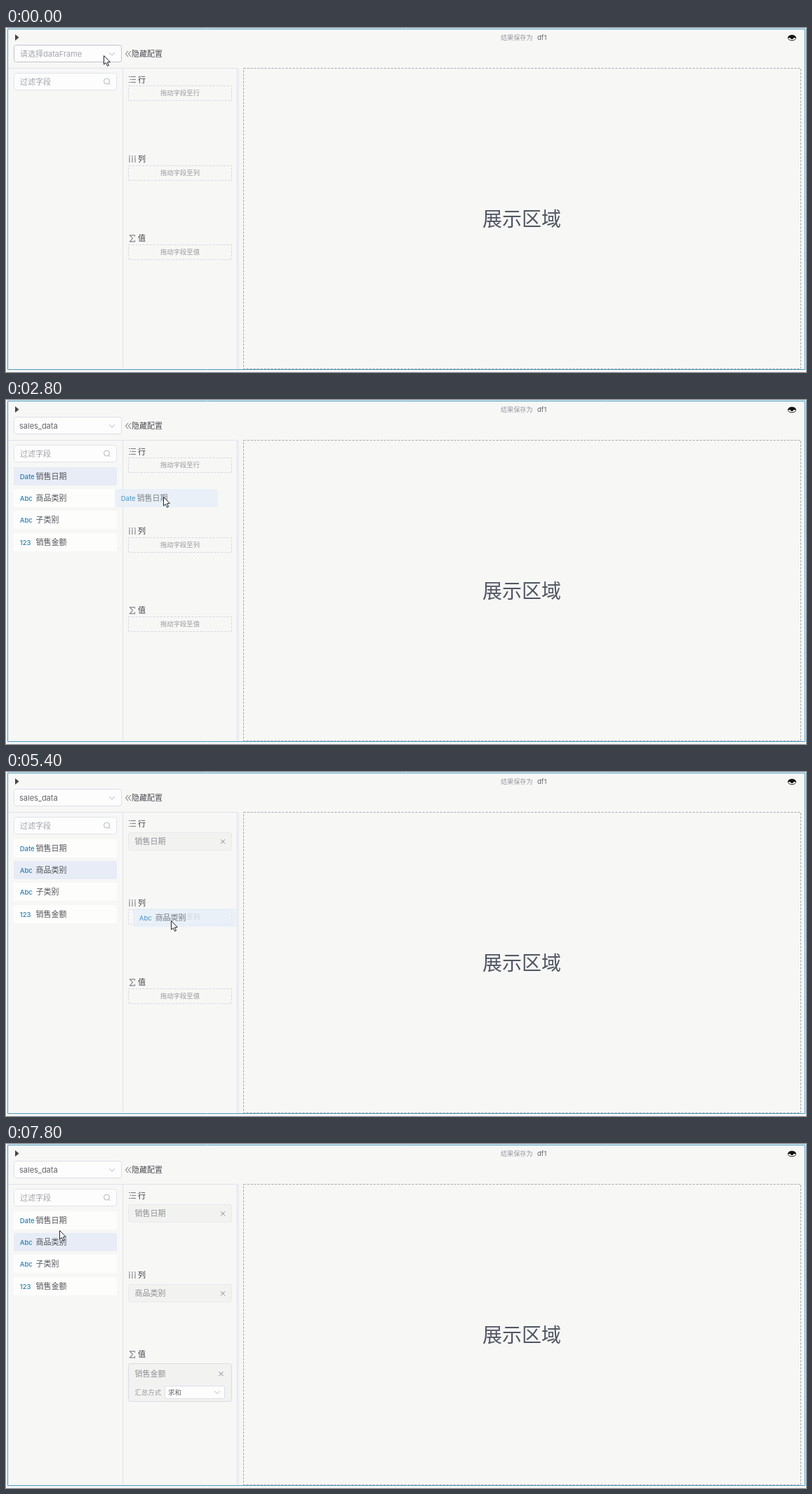
Recreate the animation shown at these times as an HTML page with a canvas. Size 1140 px wide and 491 px high, loop 8 s.

```html
<!DOCTYPE html>
<html lang="zh-CN">
<head>
<meta charset="utf-8">
<title>数据透视</title>
<style>
  html, body { margin: 0; width: 100%; height: 100%; overflow: hidden; background: #f7f7f6; }
  canvas { display: block; }
</style>
</head>
<body>
<canvas id="stage" width="1140" height="491"></canvas>
<script>
const ctx = document.getElementById('stage').getContext('2d');
const LOOP = 8000, STEP = 200;
const BG = '#f7f7f6', INK = '#4b4d52', MUTED = '#96989c', BLUE = '#2580b5', LINE = '#dcdfe8';
const FIELDS = [['Date', '销售日期'], ['Abc', '商品类别'], ['Abc', '子类别'], ['123', '销售金额']];

// Pointer stops: step, x, y
const PATH = [
  [0, 139, 39], [3, 139, 39], [5, 121, 80], [6, 121, 86], [8, 121, 86],
  [10, 110, 100], [12, 79, 107], [13, 95, 112], [14, 224, 138], [15, 240, 110],
  [16, 235, 100], [17, 180, 130], [18, 130, 152], [20, 92, 198], [22, 66, 160],
  [23, 65, 144], [24, 65, 144], [25, 85, 150], [26, 170, 185], [27, 235, 212],
  [28, 230, 220], [29, 140, 258], [30, 62, 203], [31, 85, 222], [32, 180, 281],
  [33, 222, 330], [34, 222, 345], [35, 222, 369], [37, 222, 369], [38, 140, 230], [39, 76, 123]
];
const DRAGS = [
  { from: 13, drop: 16, field: 0, dx: 69, dy: 11 },
  { from: 25, drop: 28, field: 1, dx: 54, dy: 17 },
  { from: 31, drop: 34, field: 3, dx: 52, dy: 26 }
];
const ZONES = [['行', 73.5], ['列', 187], ['值', 300.3]];

function pointerAt(step) {
  const i = Math.max(1, PATH.findIndex(p => p[0] >= step));
  const [s0, x0, y0] = PATH[i - 1], [s1, x1, y1] = PATH[i];
  const k = (step - s0) / (s1 - s0);
  return { x: Math.round(x0 + (x1 - x0) * k), y: Math.round(y0 + (y1 - y0) * k) };
}

// y is the vertical middle of the text
function text(str, x, y, size, color, align = 'left', weight = 400) {
  ctx.font = `${weight} ${size}px Inter, "Noto Sans CJK SC", "Noto Sans CJK", sans-serif`;
  ctx.textAlign = align;
  ctx.fillStyle = color;
  ctx.fillText(str, x, y + size * 0.37);
}

function box(x, y, w, h, fill, stroke, radius = 2, dash = []) {
  ctx.beginPath();
  ctx.roundRect(x, y, w, h, radius);
  if (fill) { ctx.fillStyle = fill; ctx.fill(); }
  if (stroke) {
    ctx.setLineDash(dash);
    ctx.strokeStyle = stroke;
    ctx.lineWidth = 1;
    ctx.stroke();
    ctx.setLineDash([]);
  }
}

function line(points, color, width = 1) {
  ctx.beginPath();
  points.forEach(([x, y]) => ctx.lineTo(x, y));
  ctx.strokeStyle = color;
  ctx.lineWidth = width;
  ctx.stroke();
}

function polygon(points, fill) {
  ctx.beginPath();
  points.forEach(([x, y]) => ctx.lineTo(x, y));
  ctx.closePath();
  ctx.fillStyle = fill;
  ctx.fill();
}

function disc(x, y, r, fill) {
  ctx.beginPath();
  ctx.arc(x, y, r, 0, Math.PI * 2);
  ctx.fillStyle = fill;
  ctx.fill();
}

const chevron = (x, y, up) => {
  const d = up ? -2 : 2;
  line([[x - 4, y - d], [x, y + d], [x + 4, y - d]], '#b4b8c0');
};

function cross(x, y) {
  line([[x - 3, y - 3], [x + 3, y + 3]], '#85878c');
  line([[x + 3, y - 3], [x - 3, y + 3]], '#85878c');
}

// Heavy upper lid over a thin lower lid
function eye(x, y) {
  ctx.beginPath();
  ctx.ellipse(x, y, 5.6, 3.8, 0, 0, Math.PI * 2);
  ctx.fillStyle = '#fff';
  ctx.fill();
  ctx.strokeStyle = '#222';
  ctx.lineWidth = 1;
  ctx.stroke();
  ctx.beginPath();
  ctx.ellipse(x, y, 5.6, 3.8, 0, Math.PI, Math.PI * 2);
  ctx.fillStyle = '#111';
  ctx.fill();
  disc(x, y - 0.3, 2.4, '#111');
}

function drawFrame() {
  ctx.fillStyle = BG;
  ctx.fillRect(0, 0, 1140, 491);
  box(2.5, 1.5, 1136, 486, null, '#4b9bc2', 0);
  polygon([[13, 9], [18.5, 13.5], [13, 18]], '#43464c');
  text('结果保存为', 705, 13.3, 9.1, MUTED);
  text('df1', 757, 13.3, 9.6, '#63656a');
  eye(1120, 14);
  [170.5, 174.5].forEach(x => line([[x + 3.5, 33], [x, 37], [x + 3.5, 41]], '#65676c'));
  text('隐藏配置', 179, 37, 11, INK);

  line([[3, 57.5], [330, 57.5]], '#e1e3ec');
  line([[166.5, 58], [166.5, 487]], '#e1e3ec');
  line([[329.5, 58], [329.5, 487]], '#dcdee7');
  line([[331.5, 58], [331.5, 487]], '#e4e6ed');
  box(338.5, 57.5, 794, 429, null, '#a3a5a8', 0, [3, 2]);
  text('展示区域', 735, 272.5, 28, '#505664', 'center');
}

function drawSelect(step) {
  const focused = step >= 2 && step < 13, open = step >= 3 && step < 8;
  const border = focused ? '#4b8fb9' : step < 2 ? '#c0c4cc' : LINE;
  box(11.5, 24.5, 153, 24, '#fdfdfd', border, 3);
  if (step < 8) text('请选择dataFrame', 20, 37, 11, '#a3a6ad');
  else text('sales_data', 19, 37, 11, '#606266');
  chevron(151, 37, open);
}

function drawSearch() {
  box(11.5, 64.5, 146, 24, '#fdfdfd', '#e0e3ea', 3);
  text('过滤字段', 20, 77, 11, '#a0a3aa');
  ctx.beginPath();
  ctx.arc(143.5, 76, 4, 0, Math.PI * 2);
  ctx.strokeStyle = '#b0b4be';
  ctx.lineWidth = 1;
  ctx.stroke();
  line([[146.5, 79], [148.5, 81]], '#b0b4be');
}

function fieldLabel(field, x, y) {
  const [type, name] = FIELDS[field];
  text(type, x + 8.7, y + 13.3, 9.5, BLUE, 'left', 500);
  text(name, x + 31.5, y + 13, 11, '#505257');
}

function drawFields(active) {
  FIELDS.forEach((_, i) => {
    const y = 96 + Math.round(i * 31.2);
    box(11, y, 147, 26, i === active ? '#e8ecf6' : '#fdfdfc');
    fieldLabel(i, 11, y);
  });
}

function drawZoneIcon(index, y) {
  const color = '#85878c';
  if (index === 2) {
    line([[183.5, y - 2.5], [183.5, y - 4.5], [176.5, y - 4.5], [180.5, y],
      [176.5, y + 4.5], [183.5, y + 4.5], [183.5, y + 2.5]], color, 1.2);
    return;
  }
  for (let i = -1; i <= 1; i++) {
    const d = i * 4;
    if (index === 0) {
      const indent = i ? 0 : 1.5;
      line([[175 + indent, y + d], [177 + indent, y + d]], color, 1.2);
      line([[177.7 + indent, y + d], [185, y + d]], color, 1.2);
    } else {
      line([[180 + d, y - 5], [180 + d, y - 3]], color, 1.2);
      line([[180 + d, y - 2.4], [180 + d, y + 5]], color, 1.2);
    }
  }
}

function drawZones(step) {
  ZONES.forEach(([name, y], i) => {
    const { field, drop } = DRAGS[i], top = Math.floor(y);
    drawZoneIcon(i, y);
    text(name, 188, y, 11, '#3f4146');
    if (step < drop) {
      box(174.5, top + 9.5, 147, 21, null, '#d5d7dd', 0, [3, 2]);
      text(`拖动字段至${name}`, 248, top + 20, 9.35, MUTED, 'center');
      return;
    }
    const isValue = i === 2;
    box(174.5, top + 13.5, 147, isValue ? 54 : 25, '#f2f2f1', isValue ? '#dadce2' : '#e8e9ec', 3);
    text(FIELDS[field][1], 183.5, top + (isValue ? 28 : 26.3), 11, '#8d8f94');
    cross(isValue ? 306.5 : 309, top + (isValue ? 28 : 26.3));
    if (isValue) {
      text('汇总方式', 183.5, 354.2, 9.4, MUTED);
      box(226.5, 345.5, 85, 18, '#fdfdfd', LINE, 2);
      text('求和', 231, 354.2, 9.4, '#606266');
      chevron(301, 354.5, false);
    }
  });
}

function drawDropdown() {
  ctx.save();
  ctx.shadowColor = 'rgba(40,50,80,.16)';
  ctx.shadowBlur = 8;
  ctx.shadowOffsetY = 1;
  box(11, 58, 155, 38, '#fefefe', null, 3);
  ctx.restore();
  polygon([[83, 58.5], [88, 54], [93, 58.5]], '#fefefe');
  ctx.fillStyle = '#f4f6fa';
  ctx.fillRect(11, 65, 155, 26);
  text('sales_data', 27.5, 77.5, 11, '#606266');
}

function drawGhost({ field, dx, dy }, { x, y }) {
  ctx.save();
  ctx.globalAlpha = 0.7;
  box(x - dx, y - dy, 147, 26, '#e4eef9');
  fieldLabel(field, x - dx, y - dy);
  ctx.restore();
}

function drawPointer({ x, y }) {
  ctx.save();
  ctx.translate(x + 0.5, y + 0.5);
  polygon([[0, 0], [0, 12.5], [2.8, 10], [5, 14.8], [7, 13.8], [4.9, 9.3], [8.8, 9.1]], '#fff');
  ctx.strokeStyle = '#22242c';
  ctx.lineWidth = 1;
  ctx.stroke();
  ctx.restore();
}

function draw(time) {
  const step = Math.floor(time / STEP);
  const pointer = pointerAt(step);
  const drag = DRAGS.find(d => step >= d.from && step < d.drop);
  const overList = pointer.x >= 11 && pointer.x <= 158;
  const active = drag ? drag.field : overList ? Math.floor((pointer.y - 90) / 31.2) : -1;

  drawFrame();
  drawSelect(step);
  drawSearch();
  if (step >= 9) drawFields(active);
  drawZones(step);
  if (step >= 3 && step < 8) drawDropdown();
  if (drag) drawGhost(drag, pointer);
  if (step === 2 || step === 7) disc(pointer.x, pointer.y + 0.5, 12.8, '#eee00c');
  drawPointer(pointer);
}

const start = performance.now();
function tick() {
  draw((performance.now() - start) % LOOP);
  requestAnimationFrame(tick);
}
tick();
</script>
</body>
</html>
```
